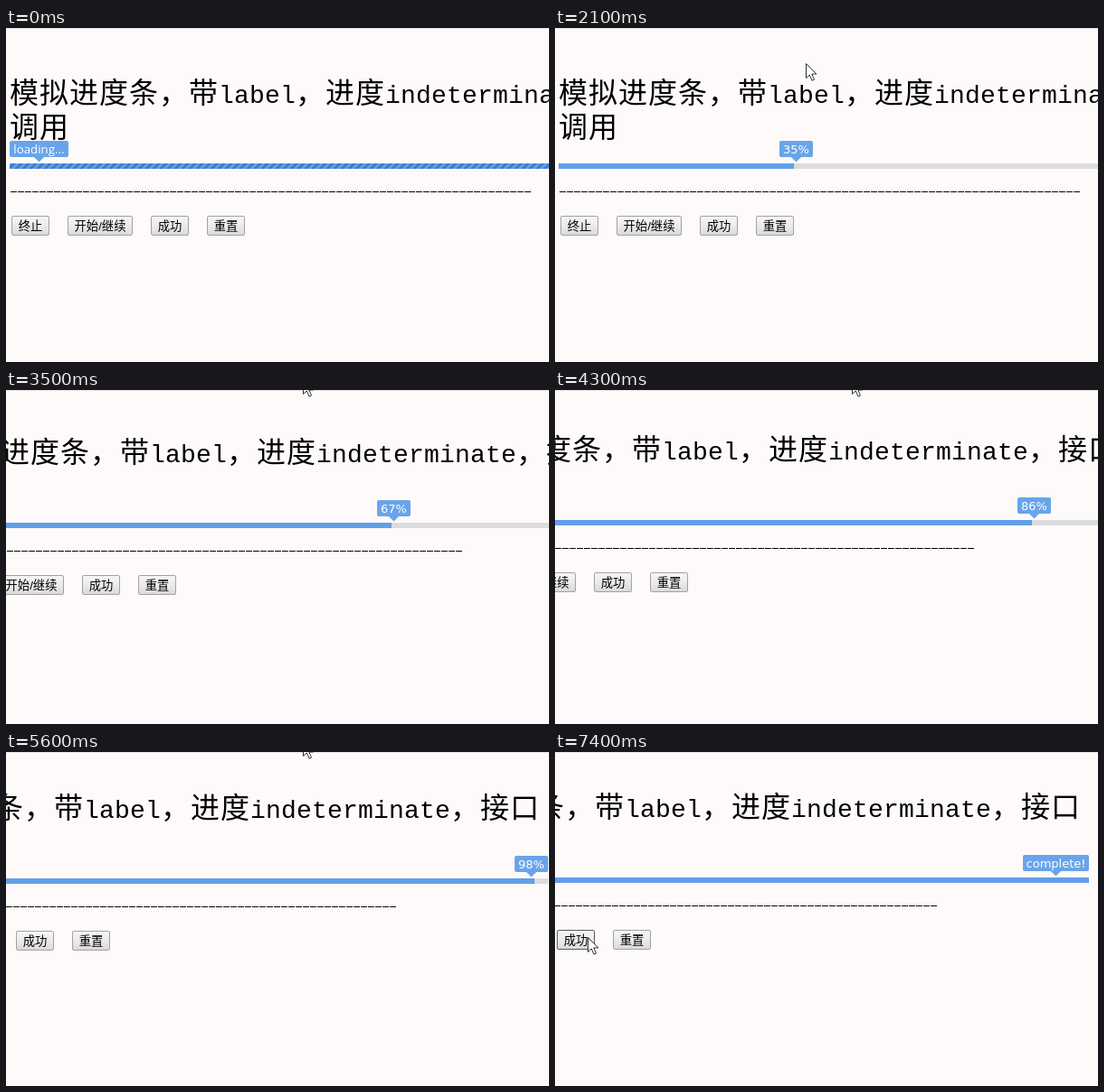
These frames come from a looping animation (600 by 370 pixels, 8 s). An HTML page:

```html
<!DOCTYPE html>
<html lang="zh-CN">
<head>
<meta charset="utf-8">
<title>Progress bar</title>
<style>
html, body { margin: 0; width: 100%; height: 100%; overflow: hidden; background: #fffafa; }
svg { display: block; }
text { white-space: pre; }
.title { font: 32px "Noto Sans CJK SC", "Noto Sans CJK", sans-serif; letter-spacing: 1px; }
.latin { font: 28px "Liberation Mono", monospace; letter-spacing: .2px; }
.button rect { fill: url(#face); stroke: #a2a2a2; }
.button.hover rect { stroke: #5c5c5c; }
.button text { font: 13.33px "Liberation Sans", "Noto Sans CJK SC", "Noto Sans CJK", sans-serif; text-anchor: middle; }
#label text { font: 13px "DejaVu Sans", sans-serif; fill: #fff; text-anchor: middle; }
#label.loading text { font: 13.3px "Open Sans", sans-serif; }
</style>
</head>
<body>
<svg width="600" height="370" viewBox="0 0 600 370">
  <defs>
    <linearGradient id="face" x2="0" y2="1">
      <stop stop-color="#f6f6f6"/><stop offset=".5" stop-color="#ebebeb"/><stop offset="1" stop-color="#d9d9d9"/>
    </linearGradient>
  </defs>
  <rect width="600" height="370" fill="#fffafa"/>
  <rect width="600" height="1" fill="#e6e2e2"/>
  <g id="page">
    <g class="title">
      <text x="4" y="83">模拟进度条，带<tspan class="latin" x="235">label</tspan><tspan x="320">，进度</tspan><tspan class="latin" x="419">indeterminate</tspan><tspan x="640">，接口</tspan></text>
      <text x="4" y="121">调用</text>
    </g>
    <rect x="4" y="150" width="744" height="6" fill="#dcdcdc"/>
    <rect id="fill" x="4" y="150" height="6" fill="#629fe8"/>
    <svg id="stripes" x="4" y="150" width="744" height="6">
      <path d="M-16 0H768" transform="translate(0 3) skewX(-45)" stroke="#3f7cc6" stroke-width="6" stroke-dasharray="4 4"/>
    </svg>
    <g id="label">
      <rect y="125" height="18" rx="2" fill="#69a4ea"/>
      <path d="M-5.5 143H5.5L0 148.500Z" fill="#69a4ea"/>
      <text y="139"></text>
    </g>
    <path d="M5 181.500H580" stroke="#000" stroke-dasharray="7 1"/>
    <g id="buttons"></g>
  </g>
  <path id="cursor" d="M.5 .5V16.500L4.300 13L7 19.200L9.500 18.100L6.800 12H11.800Z" fill="#fff" stroke="#2b2f3a"/>
</svg>
<script>
const LOOP = 8000, BAR_X = 4, BAR_W = 744;
const $ = id => document.getElementById(id);

// Each key is [time, ...values].
const progressKeys = [[800, 0], [900, 2], [1300, 14], [1400, 14], [2300, 41], [2700, 50],
  [3500, 67], [4300, 86], [4800, 98], [7200, 98], [7300, 100]];
const scrollKeys = [[2300, 0, 0], [2500, -4, 1], [2700, -15, 1], [3200, -52, 0], [3500, -76, -3],
  [4100, -108, -6], [4300, -117, -6], [4800, -141, -9], [5100, -141, -9], [5200, -143, -9],
  [5400, -143, -9], [5600, -149, -10], [6000, -156, -11], [6100, -156, -11], [6200, -158, -11]];
const cursorKeys = [[100, 610, 126], [400, 430, 133], [800, 97, 219], [1400, 97, 219],
  [2300, 328, -12], [6400, 328, -12], [6900, 60, 209], [7100, 36, 205]];

function at(keys, t) {
  const i = keys.findIndex(k => k[0] > t);
  if (i === 0) return keys[0].slice(1);
  if (i < 0) return keys.at(-1).slice(1);
  const a = keys[i - 1], b = keys[i], u = (t - a[0]) / (b[0] - a[0]);
  return a.slice(1).map((v, n) => v + (b[n + 1] - v) * u);
}

function setAttributes(el, attributes) {
  for (const name in attributes) el.setAttribute(name, attributes[name]);
}

$('buttons').innerHTML = [['终止', 6, 42], ['开始/继续', 68, 72], ['成功', 160, 42], ['重置', 222, 42]]
  .map(([text, x, w]) => `<g class="button"><rect x="${x + .5}" y="208.5" width="${w - 1}" height="21" rx="1.5"/>
    <text x="${x + w / 2}" y="224">${text}</text></g>`).join('');
const [, startButton, successButton] = $('buttons').children;
const [bubble, arrow, caption] = $('label').children;

function render(t) {
  const loading = t < 900, complete = t >= 7300;
  const percent = Math.round(at(progressKeys, t)[0]);
  const filled = loading ? BAR_W : Math.round(BAR_W * percent / 100);
  $('fill').setAttribute('width', filled);
  $('stripes').style.display = loading ? '' : 'none';
  $('stripes').firstElementChild.setAttribute('stroke-dashoffset', -t / 50);

  const width = loading ? 65 : complete ? 73 : 37;
  const left = loading ? BAR_X
    : Math.max(BAR_X, Math.min(BAR_X + filled - 16, BAR_X + BAR_W - width));
  const middle = left + width / 2;
  $('label').setAttribute('class', loading ? 'loading' : '');
  setAttributes(bubble, { x: left, width });
  arrow.setAttribute('transform', `translate(${middle})`);
  caption.setAttribute('x', middle);
  caption.textContent = loading ? 'loading...' : complete ? 'complete!' : percent + '%';

  const move = keys => `translate(${at(keys, t).map(Math.round)})`;
  $('page').setAttribute('transform', move(scrollKeys));
  $('cursor').setAttribute('transform', move(cursorKeys));
  startButton.classList.toggle('hover', t >= 800 && t < 1500);
  successButton.classList.toggle('hover', t >= 7100);
}

function tick() {
  render(Math.floor(performance.now() % LOOP / 100) * 100);
  requestAnimationFrame(tick);
}
tick();
</script>
</body>
</html>
```
